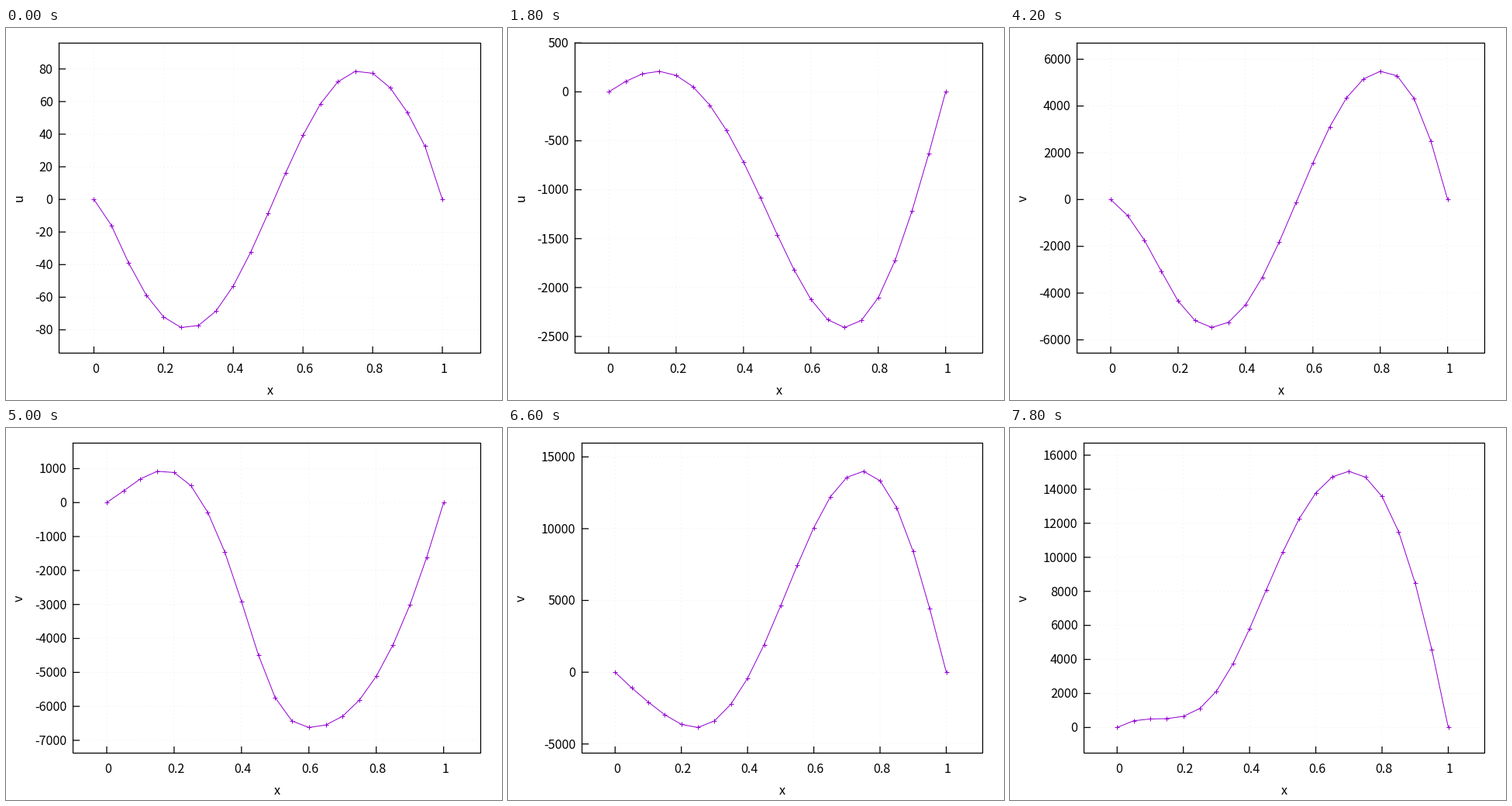
A matplotlib script that plays this animation: 640 px wide and 480 px high, repeating every 8000 ms.

```python
import numpy as np
import matplotlib.pyplot as plt
from matplotlib.animation import FuncAnimation

W, H, DPI = 640, 480, 100
RIGHT, TOP, BOTTOM = 612.5, 19.5, 419.5
STEPS, SUBSTEPS, DT = 20, 100, 0.0005
CELLS = 20
FORCE = 2e4 * np.pi
PURPLE = "#9400d3"


def px(n):
    return n * 72 / DPI


def tridiag(side, mid, n):
    return mid * np.eye(n) + side * (np.eye(n, k=1) + np.eye(n, k=-1))


def simulate():
    """String driven by a moving sine load: linear elements, implicit Euler."""
    x = np.linspace(0, 1, CELLS + 1)
    n = CELLS - 1
    mass = tridiag(1 / 6, 4 / 6, n)
    stiff = 2 * CELLS**2 * tridiag(-1, 2, n)
    solve = np.linalg.inv(mass + DT**2 * stiff)
    u, v = np.zeros(n), np.zeros(n)
    us, vs = [], []
    for i in range(1, STEPS * SUBSTEPS + 1):
        load = -FORCE * np.sin(2 * np.pi * (x[1:-1] - i * DT))
        v = solve @ (mass @ v + DT * (load - stiff @ u))
        u = u + DT * v
        if i % SUBSTEPS == 0:
            us.append(np.pad(u, 1))
            vs.append(np.pad(v, 1))
    return x, us, vs


def padded(data):
    lo, hi = data.min(), data.max()
    span = hi - lo
    return lo - 0.1 * span, hi + 0.11 * span


def tics(lo, hi):
    power = 10 ** np.floor(np.log10(hi - lo))
    slots = 20 * power / (hi - lo)
    step = power * (0.2 if slots > 10 else 0.5 if slots > 4 else 1)
    first = int(np.ceil(lo / step - 0.01))
    last = int(np.floor(hi / step + 0.01))
    return [k * step for k in range(first, last + 1)]


X, U, V = simulate()

plt.rcParams["font.family"] = "Noto Sans CJK JP"
plt.rcParams["font.size"] = px(16.2)
plt.rcParams["path.snap"] = False
fig = plt.figure(figsize=(W / DPI, H / DPI), dpi=DPI, facecolor="white")
ax = fig.add_axes([0, 0, 1, 1])


def line(xs, ys, **style):
    ax.plot(xs, ys, **{"color": "black", "lw": px(1.25), **style})


def grid(xs, ys):
    line(xs, ys, color="#a0a0a0", lw=px(0.5), alpha=0.4, zorder=1,
         linestyle=(0, (2, 8)), dash_capstyle="butt")


def draw(i):
    ax.cla()
    ax.set(xlim=(0, W), ylim=(H, 0))
    ax.axis("off")

    name, data = ("u", U[i]) if i < STEPS else ("v", V[i - STEPS])
    (x0, x1), (y0, y1) = padded(X), padded(data)
    xtics, ytics = tics(x0, x1), tics(y0, y1)

    # Positive labels reserve room for a sign.
    chars = max(len(f"{t: g}") for t in ytics)
    left = 68.5 + 9 * (chars - 3)

    def sx(x):
        return left + (x - x0) / (x1 - x0) * (RIGHT - left)

    def sy(y):
        return BOTTOM - (y - y0) / (y1 - y0) * (BOTTOM - TOP)

    for t in ytics:
        y = sy(t)
        grid([left, RIGHT], [y, y])
        line([left, left + 8], [y, y])
        ax.text(left - 8, y + 5.8, f"{t:g}", ha="right", va="baseline")
    for t in xtics:
        x = sx(t)
        grid([x, x], [BOTTOM, TOP])
        line([x, x], [BOTTOM, BOTTOM - 8])
        ax.text(x + 2, 445, f"{t:g}", ha="center", va="baseline")

    line(sx(X), sy(data), color=PURPLE, lw=px(1), marker="+",
         markersize=px(6), markeredgewidth=px(1), zorder=3)
    line([left, RIGHT, RIGHT, left, left], [TOP, TOP, BOTTOM, BOTTOM, TOP],
         solid_joinstyle="miter", zorder=4)

    ax.text((left + RIGHT) / 2, 473, "x", ha="center", va="baseline")
    ax.text(22, (TOP + BOTTOM) / 2, name, rotation=90,
            rotation_mode="anchor", ha="center", va="baseline")
    return []


anim = FuncAnimation(fig, draw, frames=2 * STEPS, interval=200,
                     init_func=lambda: [], repeat=True, repeat_delay=0)
plt.show()
```
